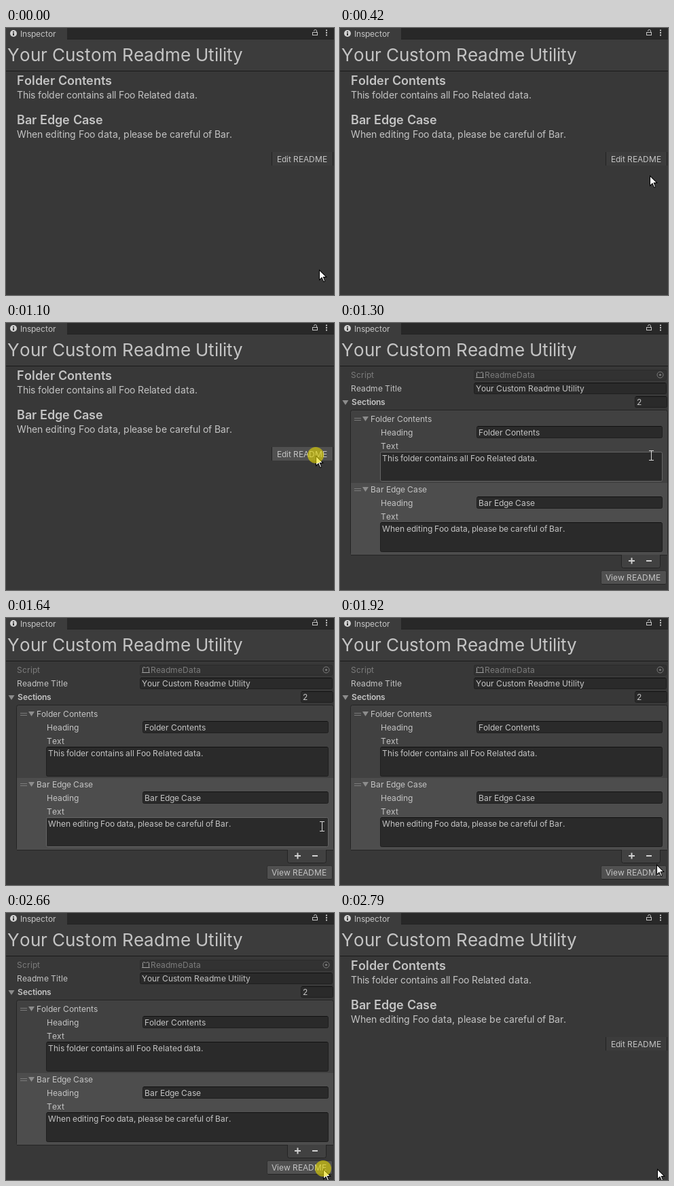
An HTML page with a canvas that plays this animation: 483x394 px, repeating every 3190 ms.

```html
<!DOCTYPE html>
<html lang="en">
<head>
<meta charset="utf-8">
<title>Readme inspector</title>
<style>
  html, body { margin: 0; width: 100%; height: 100%; overflow: hidden; background: #383838; }
  canvas { display: block; width: 483px; height: 394px; }
</style>
</head>
<body>
<canvas id="stage" width="483" height="394"></canvas>
<script>
const ctx = document.getElementById('stage').getContext('2d');
const LOOP = 3190, STEP = 70;
const TEXT = '#c4c4c4', DIM = '#7c7c7c';

const sections = [
  ['Folder Contents', 'This folder contains all Foo Related data.'],
  ['Bar Edge Case', 'When editing Foo data, please be careful of Bar.']
];

// Pointer moves: start time, number of steps, end point, ease-out power
const home = { x: 461, y: 356 };
const moves = [
  { at: 0, steps: 10, x: 456, y: 195, power: 2.17 },
  { at: 1360, steps: 10, x: 467, y: 370, power: 2 },
  { at: 2320, steps: 3, x: 467, y: 377, power: 1.5 }
];

function pointer(t) {
  let { x, y } = home;
  for (const m of moves) {
    if (t < m.at) break;
    const u = Math.min(Math.floor((t - m.at) / STEP) / m.steps, 1);
    const k = 1 - Math.pow(1 - u, m.power);
    x += (m.x - x) * k;
    y += (m.y - y) * k;
  }
  return { x: Math.floor(x), y: Math.floor(y) };
}

function rect(x, y, w, h, color) {
  ctx.fillStyle = color;
  ctx.fillRect(x, y, w, h);
}

function box(x, y, w, h, fill, line, r = 2) {
  ctx.beginPath();
  ctx.roundRect(x + 0.5, y + 0.5, w - 1, h - 1, r);
  ctx.fillStyle = fill;
  ctx.fill();
  ctx.strokeStyle = line;
  ctx.lineWidth = 1;
  ctx.stroke();
}

function disc(x, y, r, color) {
  ctx.beginPath();
  ctx.arc(x, y, r, 0, Math.PI * 2);
  ctx.fillStyle = color;
  ctx.fill();
}

// Glyphs sit on whole pixels, as in the editor's own text layout
function label(str, x, y, size = 12, color = TEXT, weight = 400) {
  ctx.font = `${weight} ${size}px Inter, sans-serif`;
  ctx.fillStyle = color;
  for (const ch of str) {
    ctx.fillText(ch, x, y);
    x += Math.round(ctx.measureText(ch).width);
  }
}

function shape(points, fill, x = 0, y = 0) {
  ctx.beginPath();
  points.forEach(([dx, dy]) => ctx.lineTo(x + dx, y + dy));
  ctx.closePath();
  ctx.fillStyle = fill;
  ctx.fill();
}

function foldout(x, y) {
  shape([[0, 0], [9, 0], [4.5, 7]], '#8c8c8c', x, y);
}

function field(x, y, w, h, hover) {
  box(x, y, w, h, '#2a2a2a', hover ? '#656565' : '#1f1f1f');
  if (!hover) rect(x + 2, y, w - 4, 1, '#111');
}

function lockIcon() {
  ctx.strokeStyle = TEXT;
  ctx.lineWidth = 1;
  ctx.strokeRect(451.5, 6.5, 7, 4);
  ctx.beginPath();
  ctx.moveTo(457.5, 6);
  ctx.lineTo(457.5, 4.5);
  ctx.arc(455.5, 4.5, 2, 0, Math.PI, true);
  ctx.stroke();
}

function bookIcon(x, y) {
  ctx.strokeStyle = '#a2a2a2';
  ctx.lineWidth = 1;
  ctx.beginPath();
  ctx.moveTo(x + 5.5, y + 1.5);
  ctx.lineTo(x + 2.5, y + 0.5);
  ctx.lineTo(x + 1.5, y + 1.5);
  ctx.lineTo(x + 1.5, y + 7.5);
  ctx.lineTo(x + 0.5, y + 8.5);
  ctx.lineTo(x + 11.5, y + 8.5);
  ctx.lineTo(x + 10.5, y + 7.5);
  ctx.lineTo(x + 10.5, y + 1.5);
  ctx.lineTo(x + 9.5, y + 0.5);
  ctx.lineTo(x + 6.5, y + 1.5);
  ctx.stroke();
}

function drawWindow() {
  rect(0, 0, 483, 394, '#383838');
  rect(0, 0, 483, 17, '#282828');
  rect(0, 16, 483, 1, '#232323');
  rect(0, 0, 90, 17, '#3c3c3c');
  rect(0, 17, 483, 46, '#3c3c3c');
  rect(0, 63, 483, 1, '#1a1a1a');

  disc(11, 8, 5, '#d2d2d2');
  rect(10, 5, 2, 1.5, '#333');
  rect(10, 7.5, 2, 3.5, '#333');
  label('Inspector', 21, 13);
  lockIcon();
  for (const y of [2.5, 6, 9.5]) rect(471, y, 2, 2, TEXT);
  label('Your Custom Readme Utility', 2, 49, 26);
}

function drawReader(t) {
  sections.forEach(([head, body], i) => {
    label(head, 16, 84 + i * 58, 18, TEXT, 600);
    label(body, 16, 104 + i * 58, 14);
  });
  const over = t >= 630 && t < 1300;
  const fill = t >= 1100 && t < 1300 ? '#505050' : over ? '#464646' : '#3c3c3c';
  rect(391, 183, 90, 20, fill);
  rect(391, 183, 1, 20, '#232323');
  rect(481, 183, 1, 20, '#232323');
  label('Edit README', 399, 198);
}

function drawSection(i, hover) {
  const y = 132 + i * 104;
  const [head, body] = sections[i];
  if (i === 1) rect(16, y, 466, 105, '#4d4d4d');
  rect(21, y + 8, 10, 1, '#7c7c7c');
  rect(21, y + 11, 10, 1, '#7c7c7c');
  foldout(33, y + 6);
  label(head, 45, y + 14);
  label('Heading', 60, y + 34);
  field(201, y + 20, 274, 18);
  label(head, 204, y + 34);
  label('Text', 60, y + 54);
  field(59, y + 58, 416, 44, hover);
  label(body, 62, y + 72);
}

function drawEditor(hover) {
  label('Script', 16, 81, 12, DIM);
  box(197, 69, 284, 16, '#323232', '#2b2b2b');
  bookIcon(200, 72);
  label('ReadmeData', 213, 81, 12, DIM);
  ctx.beginPath();
  ctx.arc(471.5, 76.5, 4.5, 0, Math.PI * 2);
  ctx.strokeStyle = DIM;
  ctx.stroke();
  disc(471.5, 76.5, 1.6, DIM);

  label('Readme Title', 16, 101);
  field(197, 88, 284, 17);
  label('Your Custom Readme Utility', 200, 101);

  foldout(3.5, 114);
  label('Sections', 17, 121, 12, TEXT, 600);
  field(434, 108, 48, 17);
  label('2', 437, 121);

  box(15, 128, 468, 215, '#414141', '#242424', 3);
  box(414, 338, 58, 24, '#414141', '#242424', 3);
  rect(16, 338, 466, 4, '#4d4d4d');
  sections.forEach((s, i) => drawSection(i, hover === i));
  rect(16, 342, 398, 1, '#242424');
  rect(472, 342, 10, 1, '#242424');

  rect(425, 350, 9, 2, '#d2d2d2');
  rect(428.5, 346.5, 2, 9, '#d2d2d2');
  rect(451, 350, 8, 2, '#d2d2d2');

  box(384, 365, 97, 21, '#505050', '#303030');
  rect(386, 385, 93, 1, '#242424');
  label('View README', 391, 380);
}

function drawArrow(x, y) {
  shape([[0, 0], [0, 17], [4, 13], [6.5, 19], [9, 18], [7, 12], [12, 12]], '#000', x, y);
  shape([[1, 2.4], [1, 14.6], [4.2, 11.5], [7, 17.8], [8, 17.3], [5.6, 11], [9.6, 11]], '#fff', x, y);
}

function drawBeam(x, y) {
  rect(x + 2, y - 7, 1, 15, '#d8d8d8');
  for (const dy of [-7, 7]) {
    rect(x - 1, y + dy, 3, 1, '#d8d8d8');
    rect(x + 3, y + dy, 3, 1, '#d8d8d8');
  }
}

function draw(t) {
  const p = pointer(t);
  const editing = t >= 1300 && t < 2790;
  const hover = editing ? [190, 294].findIndex(y => p.y >= y && p.y < y + 44) : -1;

  drawWindow();
  if (editing) drawEditor(hover);
  else drawReader(t);

  if (hover >= 0) drawBeam(p.x, p.y);
  else drawArrow(p.x, p.y);

  const pressed = (t >= 1100 && t < 1300) || (t >= 2660 && t < 2790);
  if (pressed) disc(p.x, p.y, 12, 'rgba(230, 217, 0, 0.6)');
}

const start = performance.now();
function tick() {
  draw((performance.now() - start) % LOOP);
  requestAnimationFrame(tick);
}
tick();
</script>
</body>
</html>
```
